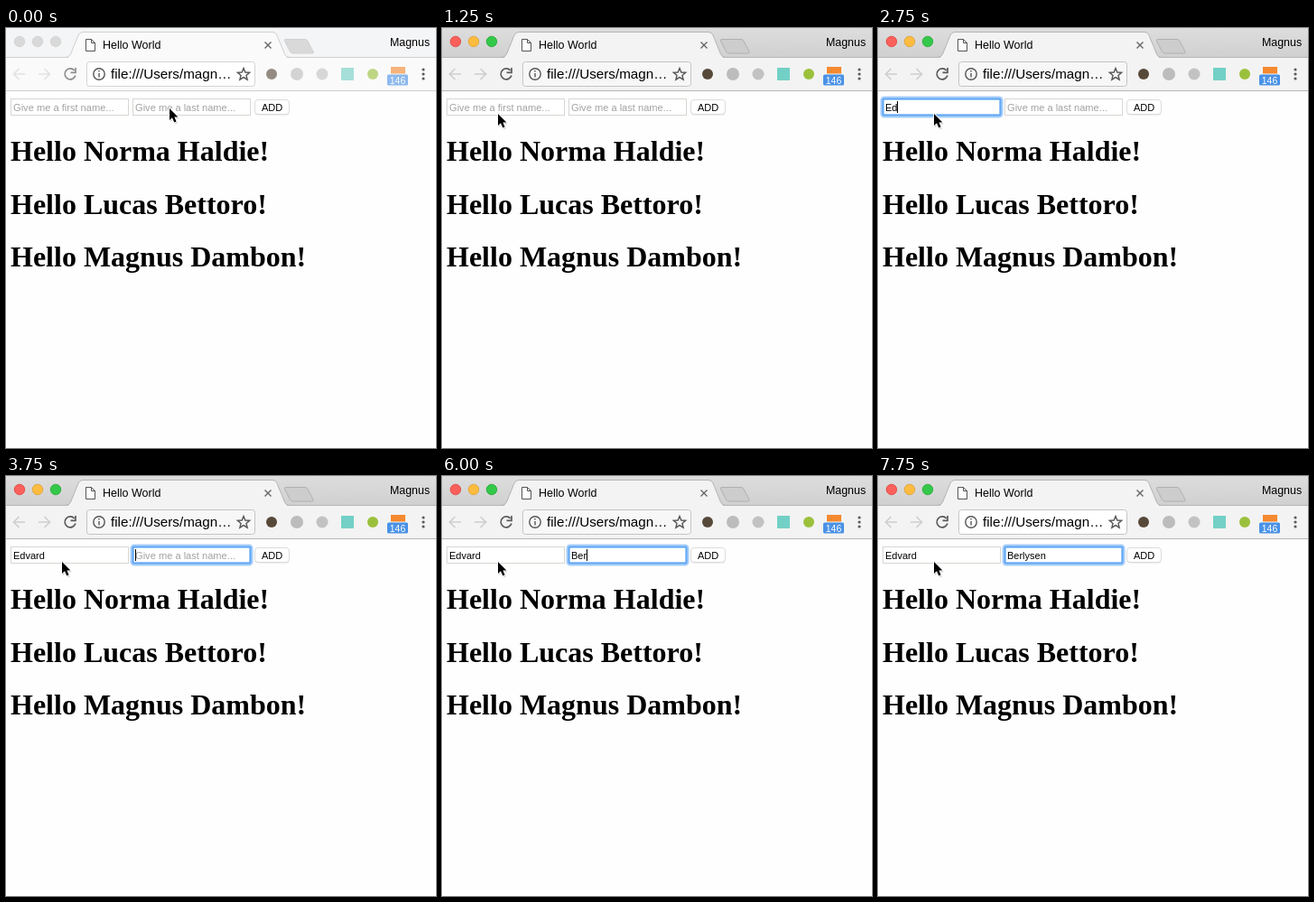
Recreate the animation shown at these times as an HTML page. Size 476 by 465 pixels, loop 8000 ms.

```html
<!DOCTYPE html>
<html lang="en">
<head>
<meta charset="utf-8">
<title>Hello World</title>
<style>
html, body { margin: 0; width: 100%; height: 100%; overflow: hidden; background: #fefefe; }
svg { display: block; width: 476px; height: 465px; font-family: "Liberation Sans", Arial, sans-serif; }
.strip { fill: url(#bar); }
.tab, .tools { fill: #f3f3f3; }
.edge { fill: none; stroke: #b4b4b4; }
.plus { fill: #cdcdcd; stroke: #b0b0b0; }
.url { fill: #f7f7f7; stroke: #c4c4c4; }
.icon { fill: none; stroke: #5a5a5a; stroke-width: 1.7; }
.faint { stroke: #cecece; }
.small { font-size: 11px; }
.hint { font-size: 11.1px; fill: #a2a2a2; }
.big { font: bold 32px "Liberation Serif", "Times New Roman", serif; }
.late .url { fill: #fff; }
.idle .strip { fill: #f4f5f6; }
.idle .tab, .idle .tools { fill: #fafafa; }
.idle .edge { stroke: #cfcfcf; }
.idle .plus { fill: #d9d9d9; stroke: #d0d0d0; }
.idle .url { fill: #fff; stroke: #d4d4d4; }
.idle .lights circle { fill: #d9d9d9; stroke: #d2d2d2; }
.idle .ext { opacity: .62; }
.idle .icon { stroke: #8d8d8d; }
.idle .faint { stroke: #e2e2e2; }
</style>
</head>
<body>
<svg viewBox="0 0 476 465">
  <defs>
    <linearGradient id="bar" x2="0" y2="1">
      <stop stop-color="#dddddd"/><stop offset="1" stop-color="#d0d0d0"/>
    </linearGradient>
  </defs>
  <rect width="476" height="465" fill="#fefefe"/>

  <g id="chrome">
    <rect class="strip" width="476" height="33"/>
    <rect class="tools" y="33" width="476" height="36"/>
    <path class="edge" d="M0 32.5H476M0 69.5H476"/>
    <path class="tab" d="M66 34Q70 33 71.5 29L80 8Q81.5 4.5 85 4.5H295Q298.5 4.5 300 8L308.5 29Q310 33 314 34Z"/>
    <path class="edge" d="M66 32.5Q70 32.5 71.5 29L80 8Q81.5 4.5 85 4.5H295Q298.5 4.5 300 8L308.5 29Q310 32.5 314 32.5"/>
    <path class="plus" d="M310 12.5H331Q333 12.5 334 14.5L340 26Q341 28 338.5 28H318Q315.5 28 314.5 26L308.5 14.5Q307.5 12.5 310 12.5Z"/>
    <g class="lights" stroke-width=".8">
      <circle cx="15" cy="15" r="5.8" fill="#fc605b" stroke="#e0443e"/>
      <circle cx="35" cy="15" r="5.8" fill="#fdbc40" stroke="#dea034"/>
      <circle cx="55" cy="15" r="5.8" fill="#34c84a" stroke="#27aa35"/>
    </g>
    <path d="M88.5 12.5H94.5L98.5 16.5V25.5H88.5ZM94.5 12.5V16.5H98.5" fill="#fff" stroke="#555"/>
    <text x="107" y="23" font-size="12.5">Hello World</text>
    <path d="M286.5 15.5L293.5 22.5M293.5 15.5L286.5 22.5" stroke="#666" stroke-width="1.4"/>
    <text x="425" y="20" font-size="12.4">Magnus</text>

    <path class="icon faint" d="M21 51H8.5M14.5 45L8.5 51L14.5 57"/>
    <path class="icon faint" d="M36 51H48.5M42.5 45L48.5 51L42.5 57"/>
    <path class="icon" d="M75.7 47A6 6 0 1 0 76.9 52.5M77 44V49.3H71.5"/>
    <rect class="url" x="89.5" y="37.5" width="186" height="27" rx="3"/>
    <g fill="none" stroke="#555" stroke-width="1.4">
      <circle cx="103" cy="51" r="6.2"/>
      <path d="M103 50V54.5M103 47V48.5"/>
      <path id="star"/>
    </g>
    <text x="116" y="56" font-size="15.2">file:///Users/magn…</text>
    <g class="ext">
      <circle cx="294" cy="51" r="6" fill="#57493a"/>
      <circle cx="322" cy="51" r="7" fill="#bcbcbc"/>
      <circle cx="350" cy="51" r="6.5" fill="#c2c2c2"/>
      <rect x="371" y="44" width="14" height="14" fill="#73d0c6"/>
      <circle cx="406" cy="51" r="6" fill="#9bc13c"/>
      <rect x="426" y="43" width="16" height="16" fill="#f5892f"/>
      <rect x="422" y="51.5" width="23" height="12" rx="1.5" fill="#4a92e6" stroke="#f6f6f6" stroke-width="2" paint-order="stroke"/>
      <text x="433.5" y="61.5" font-size="10.5" text-anchor="middle" fill="#fff">146</text>
    </g>
    <g fill="#5a5a5a">
      <circle cx="462" cy="46" r="1.6"/><circle cx="462" cy="51" r="1.6"/><circle cx="462" cy="56" r="1.6"/>
    </g>
  </g>

  <g id="fields"></g>
  <rect id="caret" y="81" width="1" height="13"/>
  <rect x="275.5" y="80" width="38" height="16.5" rx="3.5" fill="#ddd"/>
  <rect x="275.5" y="79.5" width="38" height="16" rx="3.5" fill="#fff" stroke="#dcdcdc"/>
  <text class="small" x="283" y="92">ADD</text>

  <g class="big">
    <text x="5" y="147">Hello Norma Haldie!</text>
    <text x="5" y="206">Hello Lucas Bettoro!</text>
    <text x="5" y="264">Hello Magnus Dambon!</text>
  </g>

  <g id="mouse">
    <path d="M1 1.5V15L4.2 12.2L6.5 17.5L9 16.5L6.8 11.4H11Z" opacity=".16"/>
    <path d="M0 0V13L3 10.2L5.3 15.5L7.6 14.5L5.4 9.4H9.4Z" stroke="#fff" stroke-width="1.8" paint-order="stroke"/>
  </g>
</svg>
<script>
const LOOP = 8000;
const $ = id => document.getElementById(id);

// Typing log: time, field, letters typed so far
const keys = [
  [1750, 0, 0], [2750, 0, 2], [3000, 0, 3], [3250, 0, 5], [3500, 0, 6],
  [3750, 1, 0], [5750, 1, 1], [6000, 1, 3], [6750, 1, 5], [7000, 1, 7], [7250, 1, 8]
];
// Pointer: time, x, y
const moves = [[0, 181, 89], [250, 102, 86], [500, 62, 97], [750, 62, 95]];
const latest = (list, t) => list.filter(e => e[0] <= t).pop();

const fields = [
  { x: 5, word: 'Edvard', hint: 'Give me a first name...' },
  { x: 140, word: 'Berlysen', hint: 'Give me a last name...' }
];
$('fields').innerHTML = fields.map(({ x }) => `
  <rect x="${x + .5}" y="78.5" width="130" height="18" fill="#fff" stroke="#d8d6d2"/>
  <g class="ring" fill="none">
    <rect x="${x - .5}" y="77.5" width="132" height="20" rx="2.5" stroke="#a9cffa" stroke-width="4"/>
    <rect x="${x + .5}" y="78.5" width="130" height="18" rx="1" stroke="#62a8f3" stroke-width="2"/>
  </g>
  <text class="small" x="${x + 3}" y="92"></text>`).join('');
const rings = document.querySelectorAll('.ring');
const labels = document.querySelectorAll('#fields text');

let star = '';
for (let i = 0; i < 10; i++) {
  const r = i % 2 ? 3.1 : 7, a = i * Math.PI / 5;
  star += `${i ? 'L' : 'M'}${263 + r * Math.sin(a)} ${51.5 - r * Math.cos(a)}`;
}
$('star').setAttribute('d', star + 'Z');

function draw(t) {
  $('chrome').setAttribute('class', t < 1250 ? 'idle' : t < 7500 ? '' : 'late');

  const [, mx, my] = latest(moves, t);
  $('mouse').setAttribute('transform', `translate(${mx} ${my})`);

  const [since, focus, count] = latest(keys, t) || [0, -1, 0];
  fields.forEach(({ word, hint }, i) => {
    const typed = word.slice(0, i < focus ? word.length : i === focus ? count : 0);
    labels[i].textContent = typed || hint;
    labels[i].classList.toggle('hint', !typed);
    rings[i].style.display = i === focus ? '' : 'none';
  });

  const lit = focus >= 0 && Math.floor((t - since) / 500) % 2 === 0;
  $('caret').style.display = lit ? '' : 'none';
  if (lit) {
    const width = count ? labels[focus].getComputedTextLength() : 0;
    $('caret').setAttribute('x', Math.floor(fields[focus].x + 3 + width));
  }
}

const start = performance.now();
function tick() {
  draw((performance.now() - start) % LOOP);
  requestAnimationFrame(tick);
}
tick();
</script>
</body>
</html>
```
